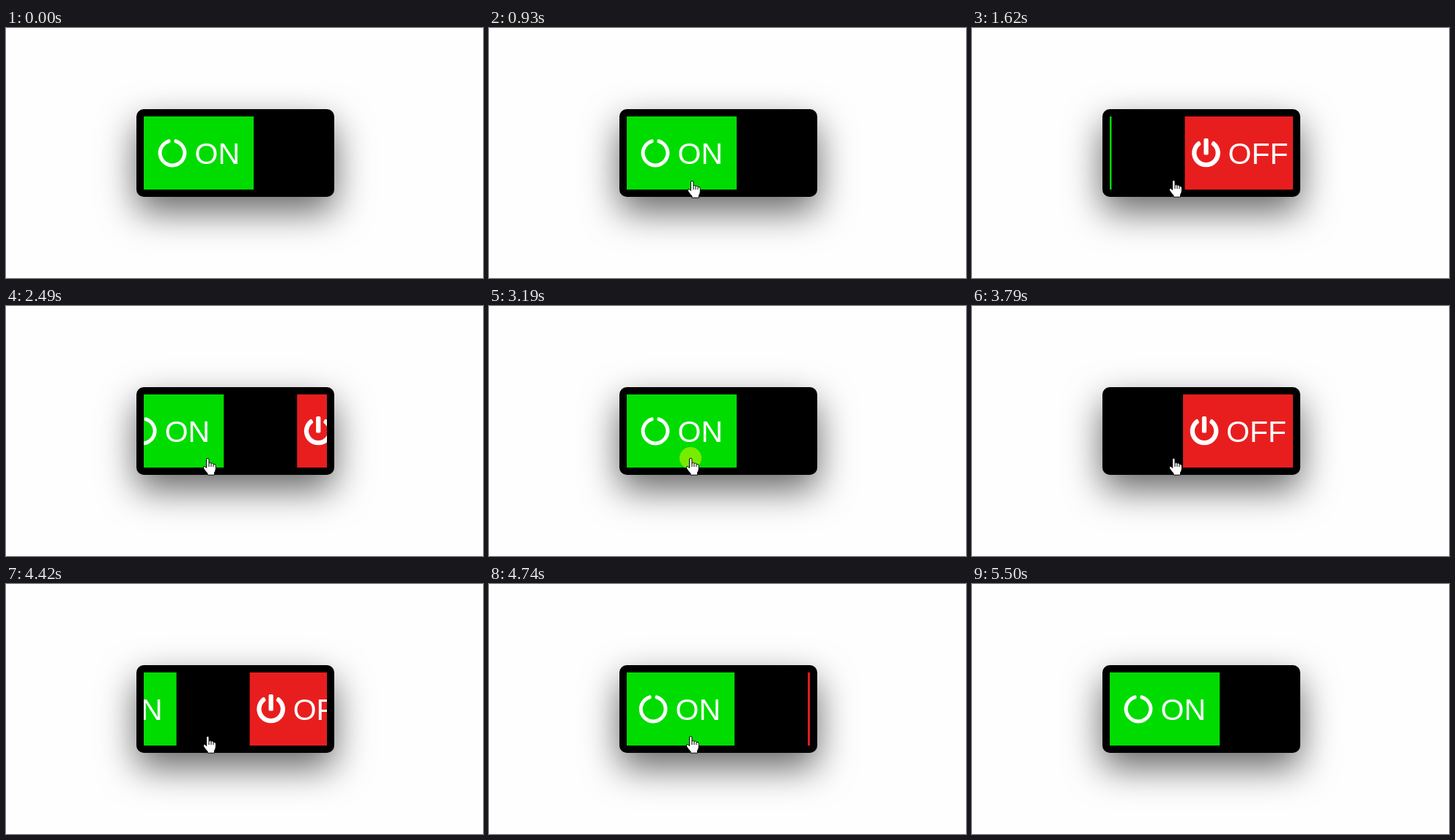
Animation of 651x342 px, one loop 6.05 s. Source, as an HTML page:

```html
<!DOCTYPE html>
<html lang="en">
<head>
<meta charset="utf-8">
<title>Toggle switch</title>
<style>
  html, body { margin: 0; width: 100%; height: 100%; overflow: hidden; background: #fefefe; }
  .switch {
    position: absolute; left: 178px; top: 111px; width: 250px; height: 100px;
    border: 10px solid #000; border-radius: 10px; background: #000;
    box-shadow: 0 20px 50px rgba(0, 0, 0, .6);
  }
  svg { position: absolute; left: 0; top: 0; display: block; }
  .switch svg { overflow: hidden; }
  text { font: 41px "Liberation Sans", Arial, sans-serif; fill: #fff; }
  .icon { fill: #fff; }
  .cursor path { fill: #fff; stroke: #000; stroke-linejoin: round; }
  .cursor .slits { fill: none; }
</style>
</head>
<body>
<div class="switch">
  <svg width="250" height="100">
    <g id="track">
      <rect width="150" height="100" fill="#00dc00"/>
      <g class="icon" transform="translate(19 30) scale(.078125)">
        <path d="M288 39V56Q288 73 306 79A184 184 0 1 1 206 79Q224 73 224 56V39Q224 11 194 16A248 248 0 1 0 318 16Q288 11 288 39Z"/>
      </g>
      <text x="69.5" y="65">ON</text>
      <g transform="translate(250 0)">
        <rect width="150" height="100" fill="#e81e1e"/>
        <g class="icon" transform="translate(9 30) scale(.078125)">
          <path d="M400 54A248 248 0 1 1 112 54Q134 41 147 62L163 90Q172 108 156 121A168 168 0 1 0 356 121Q340 108 349 90L365 62Q378 41 400 54Z"/>
          <rect x="216" width="80" height="288" rx="24"/>
        </g>
        <text x="59" y="65">OFF</text>
      </g>
    </g>
  </svg>
</div>
<svg width="651" height="342">
  <circle id="press" cx="275" cy="208" r="15" fill="#ff0" fill-opacity=".47"/>
  <g class="cursor" id="arrow">
    <path d="M.5 .5V16L4 12.8L6.4 18.3L8.8 17.2L6.5 12H11.3Z"/>
  </g>
  <g class="cursor" id="hand">
    <path d="M-1.5 2A1.7 1.7 0 0 1 2 2V7Q3.5 5.5 5 7.3Q6.8 6 8 8.3Q11 7.5 11.3 10.5V15Q11 18 9.5 20V23.2H0V21Q-3 18 -5.5 14Q-6 10.8 -3.5 11.5L-1.5 13.5Z"/>
    <path class="slits" d="M2 7V12M5 7.5V12M8 8.5V12"/>
  </g>
</svg>
<script>
const LOOP = 6050, STEP = 77.5, LEAD = 10;
const SLIDE = 500, TRAVEL = 150, HOLD = 128;
const toggles = [1211, 2263, 3270, 4317];

// The pointer enters, reaches the switch, rests there and leaves
const entry = { x: 419, y: 336, time: STEP };
const moves = [
  { from: STEP, to: 620, x: 297, y: 246 },
  { from: 620, to: 930, x: 277, y: 209 },
  { from: 1080, to: 1085, x: 275, y: 208 },
  { from: 5115, to: 5425, x: 507, y: 332 }
];
const exit = moves.at(-1).to;

const $ = id => document.getElementById(id);
const clamp = v => Math.min(1, Math.max(0, v));
const bezier = (s, a, b) => 3 * (1 - s) ** 2 * s * a + 3 * (1 - s) * s * s * b + s ** 3;

// CSS "ease"
function ease(t) {
  let lo = 0, hi = 1;
  for (let i = 0; i < 24; i++) {
    const mid = (lo + hi) / 2;
    if (bezier(mid, .25, .25) < t) lo = mid; else hi = mid;
  }
  return bezier(hi, .1, 1);
}

function slideAt(t) {
  return toggles.reduce((sum, start, i) => {
    const k = clamp((t - start) / SLIDE);
    return sum + (i % 2 ? TRAVEL : -TRAVEL) * (k && ease(k));
  }, 0);
}

function pointerAt(t) {
  let { x, y } = entry;
  for (const m of moves) {
    const k = clamp((t - m.from) / (m.to - m.from));
    x += (m.x - x) * k;
    y += (m.y - y) * k;
  }
  return [Math.round(x), Math.round(y)];
}

function show(id, on) { $(id).style.display = on ? "" : "none"; }

function draw(time) {
  const t = Math.floor((time % LOOP + LEAD) / STEP) * STEP;
  $("track").setAttribute("transform", `translate(${slideAt(t)} 0)`);
  show("press", toggles.some(start => t >= start - HOLD && t < start));

  const [x, y] = pointerAt(t);
  const visible = t >= entry.time && t <= exit;
  const over = x >= 188 && x < 438 && y < 231;
  show("hand", visible && over);
  show("arrow", visible && !over);
  $(over ? "hand" : "arrow").setAttribute("transform", `translate(${x} ${y})`);
}

let origin;
function frame(now) {
  origin ??= now;
  draw(now - origin);
  requestAnimationFrame(frame);
}
draw(0);
requestAnimationFrame(frame);
</script>
</body>
</html>
```
